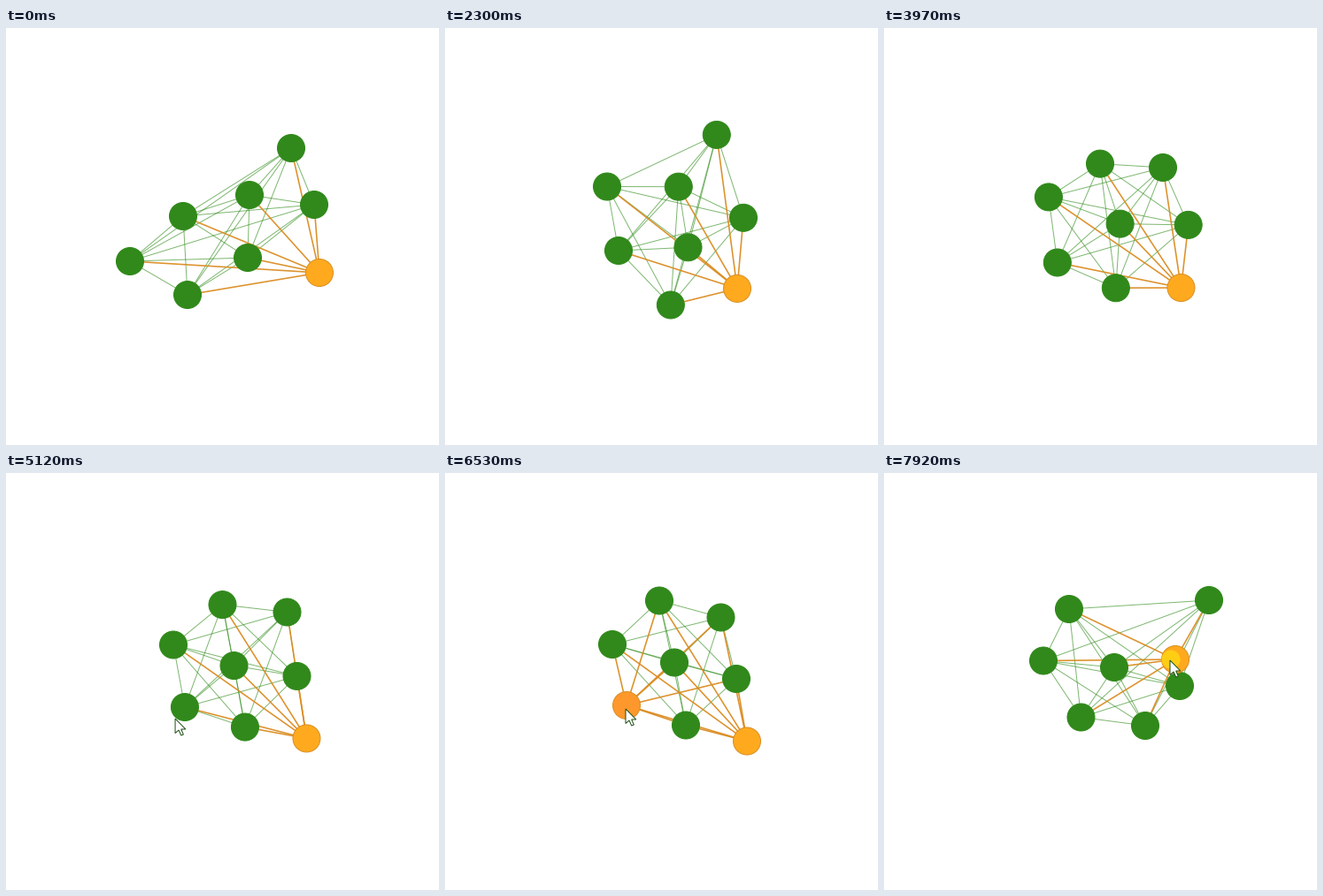
A matplotlib script that plays this animation: 489 px wide and 472 px high, repeating every 7.99 s.

```python
from itertools import combinations

import numpy as np
import matplotlib.pyplot as plt
from matplotlib.animation import FuncAnimation
from matplotlib.collections import LineCollection
from matplotlib.patches import Circle, Polygon

W, H, DPI = 489, 472, 64
PX = 72 / DPI                      # points per pixel
LOOP, STEP = 7990, 34
RADIUS = 15.5

GREEN, AMBER, HOVER = "#30891a", "#ffaa1e", "#ff982c"
RIM, HALO = "#d98f24", "#ffce14"
LINK, HOT_LINK = (0.19, 0.55, 0.10, 0.62), (0.86, 0.55, 0.13, 0.95)

PICKED, DRAGGED = 7, 3             # selected at first / dragged later
APPEAR, ENTER, GRAB, DROP = 4780, 5150, 6880, 7885

# Poses of the eight nodes while the layout settles
POSES = {
    0: [(322, 136), (275, 189), (200, 213), (140, 264),
        (205, 302), (273, 260), (348, 200), (354, 277)],
    420: [(311, 126), (275, 187), (199, 211), (116, 262),
          (205, 330), (272, 261), (372, 200), (364, 285)],
    1120: [(296.5, 118.5), (275.5, 185), (208, 204), (160, 255),
           (222.5, 303), (272.5, 258), (357, 203), (348.5, 284.5)],
    2300: [(307, 121), (263.5, 179.5), (183, 179.5), (196, 252),
           (255, 313.5), (274.5, 248), (337, 215), (330, 295)],
    3300: [(316, 151), (247, 159), (183, 187), (191, 262),
           (258, 305), (269, 228), (347, 221), (335, 298)],
    3970: [(315, 158), (244, 153.5), (186, 191.5), (196, 265.5),
           (262, 294), (266.5, 221.5), (343.5, 223), (335.5, 294)],
    5120: [(317.5, 157.5), (244.5, 149), (189, 194.5), (202, 265),
           (270, 287.5), (257.5, 218), (328.5, 230), (339.5, 300.5)],
    6530: [(311.5, 163.5), (242, 144.5), (189, 194), (205, 263),
           (272, 285.5), (259, 214.5), (329, 233), (341, 303.5)],
}
PULLED = np.array([(367, 144), (209, 154), (180, 212.5), (329, 211),
                   (222.5, 276.5), (260, 220), (334, 241), (295, 286)])
DRAG = {GRAB: (205, 263), 7080: (145, 228), 7260: (102, 170),
        7450: (150, 113), 7640: (235, 97), 7710: (264, 98),
        7800: (310, 140), DROP: (329, 211)}
POINTER = {APPEAR: (200, 356), 5120: (191, 276), 5300: (204, 267)}
ARROW = np.array([(0, 0), (0, 16.5), (4, 13), (6.7, 19), (9.3, 18),
                  (6.7, 12), (11.8, 12)])


def track(keys):
    """Monotone cubic through timed positions, held at both ends."""
    times = np.array(list(keys), float)
    pts = np.array(list(keys.values()), float)
    gaps = np.diff(times).reshape((-1,) + (1,) * (pts.ndim - 1))
    rate = np.diff(pts, axis=0) / gaps
    slope = np.concatenate([rate[:1], np.zeros_like(rate[1:]), rate[-1:]])
    a, b = rate[:-1], rate[1:]
    same = a * b > 0
    slope[1:-1] = np.where(same, 2 * a * b / np.where(same, a + b, 1), 0)

    def at(t):
        t = min(max(t, times[0]), times[-1])
        k = min(np.searchsorted(times, t, side="right") - 1, len(times) - 2)
        h = times[k + 1] - times[k]
        u = (t - times[k]) / h
        return ((1 + 2 * u) * (1 - u) ** 2 * pts[k]
                + u * (1 - u) ** 2 * h * slope[k]
                + u * u * (3 - 2 * u) * pts[k + 1]
                + u * u * (u - 1) * h * slope[k + 1])
    return at


settle, drag, pointer = track(POSES), track(DRAG), track(POINTER)


def drag_share(t):
    return min(max((t - GRAB) / (DROP - GRAB), 0), 1)


def layout(t):
    pos = settle(t)
    if t >= GRAB:
        pos = pos + (PULLED - pos) * drag_share(t) ** 2.2
        pos[DRAGGED] = drag(t)
    return pos


def tip_at(t, pos):
    if t < GRAB:
        return pointer(t)
    return pos[DRAGGED] + np.array([-1, 4]) + drag_share(t) * np.array([-5, -3])


fig = plt.figure(figsize=(W / DPI, H / DPI), dpi=DPI, facecolor="white")
ax = fig.add_axes([0, 0, 1, 1])
ax.set_xlim(0, W)
ax.set_ylim(H, 0)
ax.axis("off")

PAIRS = list(combinations(range(8), 2))
links = LineCollection([], zorder=1)
ax.add_collection(links)
nodes = [ax.add_patch(Circle((0, 0), RADIUS, lw=PX, zorder=2))
         for _ in range(8)]
halo = ax.add_patch(Circle((0, 0), 10.5, fc=HALO, lw=0, zorder=4))
cursor = ax.add_patch(Polygon(ARROW, fc="white", ec="#1d4f12", lw=PX,
                              joinstyle="miter", zorder=5))


def draw(i):
    t = i * STEP
    pos = layout(t)
    if t >= GRAB:
        active = {DRAGGED: AMBER}
    elif t >= ENTER:
        active = {PICKED: AMBER, DRAGGED: HOVER}
    else:
        active = {PICKED: AMBER}

    # Highlighted links lie over the plain ones
    hot = {p: p[0] in active or p[1] in active for p in PAIRS}
    order = sorted(PAIRS, key=hot.get)
    links.set_segments([pos[list(p)] for p in order])
    links.set_color([HOT_LINK if hot[p] else LINK for p in order])
    links.set_linewidth([(1.6 if hot[p] else 1) * PX for p in order])

    for k, node in enumerate(nodes):
        node.center = pos[k]
        node.set_facecolor(active.get(k, GREEN))
        node.set_edgecolor(RIM if k in active else GREEN)
        node.set_zorder(3 if k in active else 2)

    tip = tip_at(t, pos)
    cursor.set_visible(t >= APPEAR)
    cursor.set_xy(tip + ARROW)
    halo.set_visible(t >= GRAB)
    halo.center = tip + np.array([1, -1])
    return [links, *nodes, halo, cursor]


anim = FuncAnimation(fig, draw, frames=LOOP // STEP, interval=STEP,
                     repeat=True, repeat_delay=0, blit=False)
plt.show()
```
